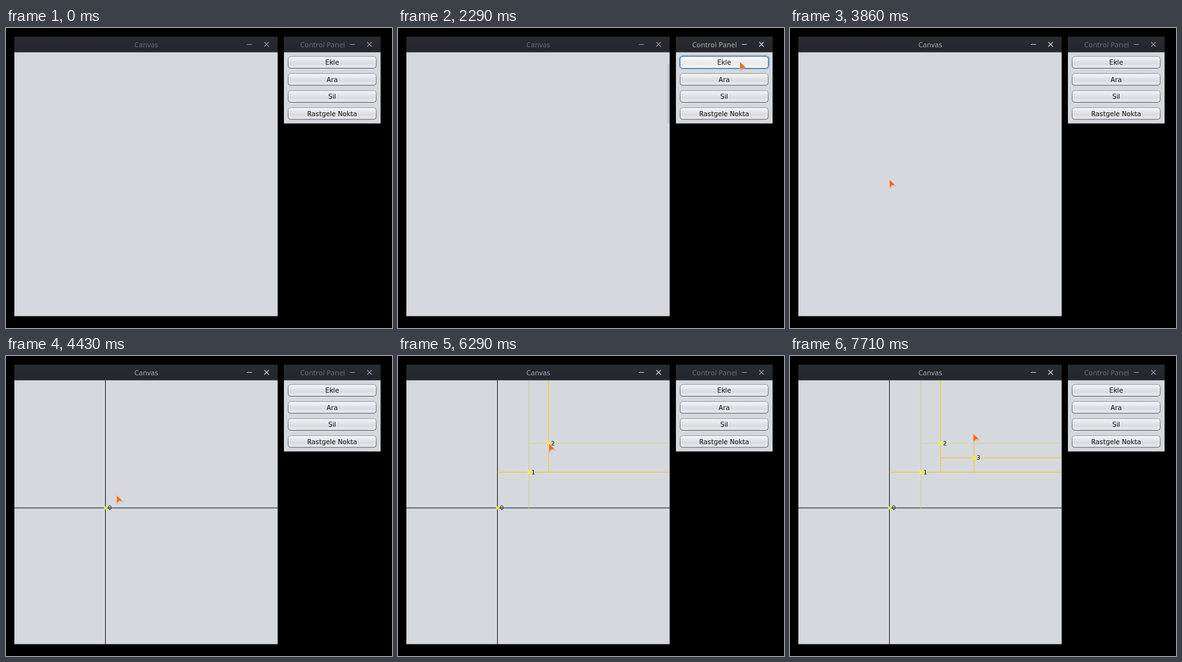
An HTML page that plays this animation: 600x466 px, repeating every 8000 ms.

```html
<!DOCTYPE html>
<html lang="tr">
<head>
<meta charset="utf-8">
<style>
html, body { margin: 0; width: 100%; height: 100%; overflow: hidden; background: #000; }
svg { display: block; width: 100vw; height: 100vh; }
.title { font: 11px "Noto Sans", sans-serif; text-anchor: middle; }
.caption { font: 10.2px "DejaVu Sans", sans-serif; text-anchor: middle; fill: #111; }
.label { font: 9px "DejaVu Sans", sans-serif; fill: #111; }
</style>
</head>
<body>
<svg id="stage" viewBox="0 0 600 466" xmlns="http://www.w3.org/2000/svg">
  <defs>
    <linearGradient id="bar" x2="0" y2="1">
      <stop stop-color="#292c31"/><stop offset="1" stop-color="#23262a"/>
    </linearGradient>
    <linearGradient id="plain" x2="0" y2="1">
      <stop stop-color="#f6f7f9"/><stop offset=".45" stop-color="#dfe2e5"/>
      <stop offset=".6" stop-color="#d8dbdf"/><stop offset="1" stop-color="#eceff1"/>
    </linearGradient>
    <linearGradient id="hover" x2="0" y2="1">
      <stop stop-color="#fdfdfe"/><stop offset=".45" stop-color="#eceef1"/>
      <stop offset=".6" stop-color="#e6e9ec"/><stop offset="1" stop-color="#fafbfc"/>
    </linearGradient>
    <linearGradient id="press" x2="0" y2="1">
      <stop stop-color="#8fa0b4"/><stop offset=".55" stop-color="#72879f"/>
      <stop offset="1" stop-color="#9db0c3"/>
    </linearGradient>
    <linearGradient id="edge" x2="0" y2="1">
      <stop stop-color="#979da3"/><stop offset="1" stop-color="#575d64"/>
    </linearGradient>
    <linearGradient id="shade">
      <stop stop-color="#000" stop-opacity="0"/><stop offset="1" stop-color="#000" stop-opacity=".14"/>
    </linearGradient>
  </defs>
</svg>
<script>
const LOOP = 8000, FPS = 7;
const stage = document.getElementById('stage');

function add(parent, tag, attrs, text) {
  const el = document.createElementNS(stage.namespaceURI, tag);
  for (const k in attrs) el.setAttribute(k, attrs[k]);
  if (text) el.textContent = text;
  parent.appendChild(el);
  return el;
}
const rect = (parent, x, y, width, height, fill, more) =>
  add(parent, 'rect', { x, y, width, height, fill, ...more });
const show = (el, on) => el.setAttribute('visibility', on ? 'visible' : 'hidden');

function addWindow(x, right, bottom, name, mid, dash, cross) {
  rect(stage, x, 13.5, right - x, 24.5, 'url(#bar)');
  rect(stage, x, 37.7, right - x, bottom - 37.7, '#d5d9dd');
  const title = add(stage, 'text', { x: mid, y: 29.5, class: 'title' }, name);
  const icons = add(stage, 'path', {
    d: `M${dash - 4} 25.5h8M${cross - 3.7} 21.6l7.4 7.4m0-7.4l-7.4 7.4`,
    fill: 'none', 'stroke-width': 1.2
  });
  return active => {
    title.setAttribute('fill', active ? '#a9aaab' : '#6b6d70');
    icons.setAttribute('stroke', active ? '#d2d3d4' : '#929497');
  };
}

function addButton(row, name) {
  const y = 44.2 + row * 26.5;
  const ring = rect(stage, 437.6, y - 0.9, 139.2, 20, 'none',
    { rx: 5, stroke: '#6f9cc6', 'stroke-width': 1.4, visibility: 'hidden' });
  const face = rect(stage, 438.5, y, 137, 18.2, 'url(#plain)', { rx: 4, stroke: 'url(#edge)' });
  const text = add(stage, 'text', { x: 507, y: y + 12.9, class: 'caption' }, name);
  return (look, focus) => {
    face.setAttribute('fill', `url(#${look})`);
    face.setAttribute('stroke', focus ? '#567b9e' : 'url(#edge)');
    text.style.fill = look === 'press' ? '#fff' : '#111';
    show(ring, focus);
  };
}

const setCanvas = addWindow(13, 422.3, 447.6, 'Canvas', 218, 378.5, 405);
const setPanel = addWindow(432, 582.3, 148.3, 'Control Panel', 492, 538.5, 565);
const shadow = rect(stage, 417, 56, 5.3, 92, 'url(#shade)');
const [setInsert] = ['Ekle', 'Ara', 'Sil', 'Rastgele Nokta'].map((name, i) => addButton(i, name));

const BLACK = '#111', GOLD = '#f7c61c', PALE = '#d6cc92';

// x, y, step of the click, vertical span, horizontal span, line colours
const nodes = [
  [154.6, 236, 28, 38, 447.6, 13, 422.3, BLACK, BLACK],
  [203.7, 180.6, 37, 38, 236.5, 154.6, 422.3, PALE, GOLD],
  [234.2, 135.6, 44, 38, 180.6, 203.7, 422.3, GOLD, PALE],
  [286.1, 158, 49, 135.6, 180.6, 234.2, 422.3, GOLD, GOLD]
].map(([x, y, at, top, bottom, left, right, vColor, hColor], i) => {
  const lines = add(stage, 'g', {});
  rect(lines, x - 0.5, top, 1, bottom - top, vColor);
  rect(lines, left, y - 0.5, right - left, 1, hColor);
  return { x, y, at, lines, name: String(i) };
});
for (const node of nodes) {
  node.mark = add(stage, 'g', {});
  rect(node.mark, node.x - 2, node.y - 2, 4.3, 4.3, '#ffff00', { rx: 1 });
  add(node.mark, 'text', { x: node.x + 3.8, y: node.y + 3.4, class: 'label' }, node.name);
}

const cursor = add(stage, 'g', {});
add(cursor, 'path', { d: 'M0 1V15L4.6 10.8H11Z', fill: '#000', opacity: .18 });
add(cursor, 'path', {
  d: 'M0 0V13.2L4 9.7L9.4 9.2Z', fill: '#fb6a14', stroke: '#e9d3c5',
  'stroke-width': .9, 'stroke-linejoin': 'round'
});

const easeIn = u => u ** 1.3, easeOut = u => 1 - (1 - u) ** 1.5;
const easeBoth = u => u * u * (3 - 2 * u);

// first step, last step, target, easing
const moves = [
  [9, 13, 531.5, 52.5, easeOut],
  [17, 20, 376.5, 37, easeIn],
  [20, 25, 154.5, 235, easeOut],
  [29, 34, 204, 180.5, easeBoth],
  [37, 42, 234.5, 135.6, easeBoth],
  [44, 48, 286, 157, easeBoth],
  [50, 54, 284.5, 113.5, easeBoth]
];

function cursorAt(step) {
  let x = 548, y = 67;
  for (const [from, to, tx, ty, ease] of moves) {
    if (step <= from) break;
    const k = ease(Math.min(1, (step - from) / (to - from)));
    x += (tx - x) * k;
    y += (ty - y) * k;
  }
  return [x, y];
}

function draw(ms) {
  const step = Math.floor((ms + 3) * FPS / 1000);
  const during = (a, b) => step >= a && step < b;
  const [x, y] = cursorAt(step);

  setPanel(during(15, 27));
  setCanvas(step >= 27);
  show(shadow, during(15, 27));
  setInsert(during(15, 16) ? 'press' : during(10, 18) ? 'hover' : 'plain', during(15, 27));
  for (const node of nodes) {
    show(node.lines, step >= node.at);
    show(node.mark, step >= node.at);
  }
  show(cursor, step >= 9);
  cursor.setAttribute('transform', `translate(${x} ${y})`);
}

const start = performance.now();
function tick() {
  draw((performance.now() - start) % LOOP);
  requestAnimationFrame(tick);
}
tick();
</script>
</body>
</html>
```
